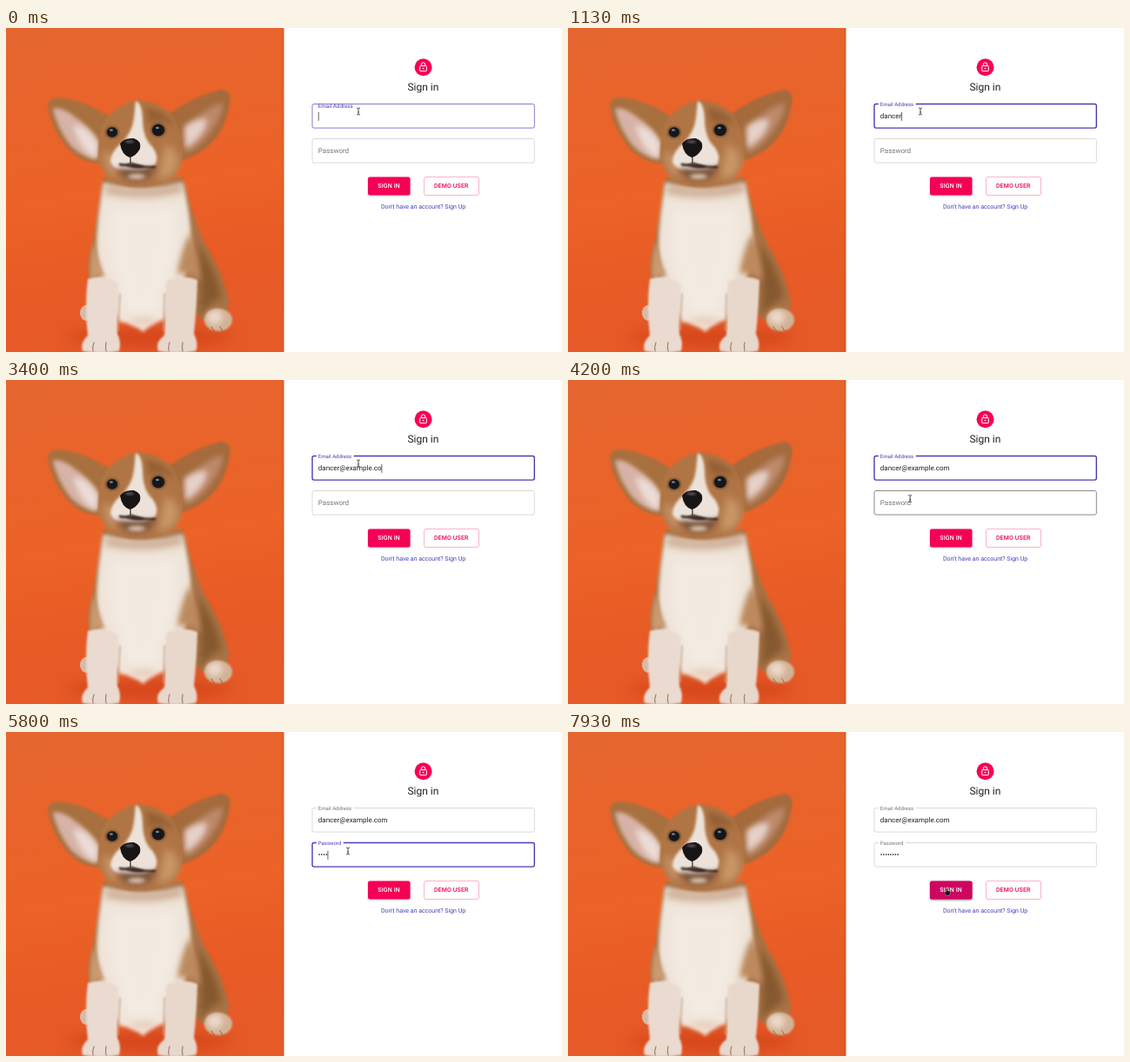
Recreate the animation shown at these times as an HTML page with a canvas. Size 639 by 373 pixels, loop 8 s.

```html
<!DOCTYPE html>
<html lang="en">
<head>
<meta charset="utf-8">
<title>Sign in</title>
<style>
  html, body { margin: 0; width: 100%; height: 100%; overflow: hidden; background: #fff; }
  canvas, svg { position: absolute; left: 0; top: 0; width: 639px; height: 373px; }
  text { font-family: Roboto, Arial, sans-serif; text-rendering: geometricPrecision; white-space: pre; }
  .body { font-size: 8px; }
  .btn { font-size: 7px; font-weight: 500; letter-spacing: .02em; text-anchor: middle; }
</style>
</head>
<body>
<canvas id="photo"></canvas>
<svg id="ui" viewBox="0 0 639 373">
  <defs>
    <linearGradient id="edge"><stop offset="0" stop-opacity="0"/><stop offset="1" stop-opacity=".1"/></linearGradient>
    <clipPath id="btnClip"><rect x="416" y="171.5" width="48.5" height="21" rx="2"/></clipPath>
    <filter id="soft" x="-20%" y="-40%" width="140%" height="180%"><feGaussianBlur stdDeviation="1.2"/></filter>
  </defs>
  <rect x="316" width="4" height="373" fill="url(#edge)"/>
  <rect x="319.5" width="320" height="373" fill="#fff"/>
  <circle cx="479.6" cy="45.3" r="10" fill="#f50057"/>
  <g fill="none" stroke="#fff" stroke-width="1">
    <rect x="475.7" y="43.6" width="7.6" height="6.1" rx=".7"/>
    <path d="M477.3 43.5V42a2.2 2.2 0 0 1 4.4 0v1.5"/>
    <circle cx="479.5" cy="46.6" r=".6" fill="#fff" stroke-width=".6"/>
  </g>
  <text x="479.4" y="71.6" font-size="12" text-anchor="middle" fill="#212121">Sign in</text>
  <g id="fields"></g>
  <rect id="shade" x="416" y="172.6" width="48.5" height="21" rx="2" filter="url(#soft)"/>
  <rect id="signIn" x="416" y="171.5" width="48.5" height="21" rx="2"/>
  <g clip-path="url(#btnClip)"><circle id="ripple" cx="436" cy="184" fill="#f50057"/></g>
  <text class="btn" x="440.1" y="184.4" fill="#fff">SIGN IN</text>
  <rect x="480.5" y="171.5" width="63" height="21" rx="2" fill="#fff" stroke="#f50057" stroke-opacity=".3"/>
  <text class="btn" x="511.7" y="184.4" fill="#f50057">DEMO USER</text>
  <text x="479.6" y="208" font-size="7" text-anchor="middle" fill="#453fb5">Don't have an account? Sign Up</text>
  <g id="mouse">
    <path id="beam" d="M-2 -4Q0 -4 0 -2.8Q0 -4 2 -4M0 -3V3M-2 4Q0 4 0 2.8Q0 4 2 4M-1 .9H1" fill="none" stroke="#444" stroke-width=".9"/>
    <path id="arrow" d="M-2 -4V3.5L-.3 1.9L.8 4.4L1.9 3.9L.8 1.5H3.2Z" fill="#111" stroke="#fff" stroke-width=".6"/>
    <path id="hand" d="M-1.8 -3.8Q-.8 -4.6 -.2 -3.6L.1 -1.4L2.6 -.9Q3.5 -.6 3.4 .6L2.6 4H-1.4L-3.6 .8Q-3.6 -.3 -2.4 0L-1.4 .6Z" fill="#111" stroke="#fff" stroke-width=".3"/>
  </g>
</svg>
<script>
const LOOP = 8000, PRIMARY = '#453fb5', GREY = '#757575';
const $ = id => document.getElementById(id);
const clamp = v => Math.min(1, Math.max(0, v));
const mix = (a, b, p) => a + (b - a) * p;
const smooth = p => p * p * (3 - 2 * p);
const easeOut = p => 1 - (1 - clamp(p)) ** 3;

function set(el, attrs) {
  for (const k in attrs) el.setAttribute(k, attrs[k]);
  return el;
}
function add(parent, tag, attrs, text = '') {
  const el = set(document.createElementNS('http://www.w3.org/2000/svg', tag), attrs);
  el.textContent = text;
  return parent.appendChild(el);
}

// ---- photo ----
function paintPhoto() {
  const cv = $('photo'), dpr = window.devicePixelRatio || 1;
  cv.width = 639 * dpr;
  cv.height = 373 * dpr;
  const c = cv.getContext('2d');
  c.scale(dpr, dpr);
  c.beginPath();
  c.rect(0, 0, 320, 373);
  c.clip();

  const shape = (color, d, blur = .8) => {
    c.filter = `blur(${blur * dpr}px)`;
    c.fillStyle = color;
    c.fill(new Path2D(d));
  };
  const oval = (color, x, y, rx, ry, blur = .6) => {
    c.filter = `blur(${blur * dpr}px)`;
    c.fillStyle = color;
    c.beginPath();
    c.ellipse(x, y, rx, ry, 0, 0, 7);
    c.fill();
  };
  const line = (color, width, d, blur = .5) => {
    c.filter = `blur(${blur * dpr}px)`;
    c.strokeStyle = color;
    c.lineWidth = width;
    c.lineCap = 'round';
    c.stroke(new Path2D(d));
  };

  const wall = c.createLinearGradient(0, 0, 60, 373);
  wall.addColorStop(0, '#e5662f');
  wall.addColorStop(.55, '#ec6227');
  wall.addColorStop(.8, '#e85b25');
  wall.addColorStop(1, '#e65a28');
  c.fillStyle = wall;
  c.fillRect(0, 0, 320, 373);
  oval('rgba(200,58,18,.55)', 165, 356, 95, 12, 8);

  // ears
  shape('#a9703f', 'M48 90Q49 80 62 80Q92 84 120 103L110 156Q88 156 72 140Q52 116 48 90Z', 1);
  shape('#d6b3a6', 'M54 93Q62 90 76 100Q98 114 108 134L105 151Q88 149 75 136Q59 116 54 93Z', 2);
  shape('#ecdcd6', 'M77 112Q94 112 106 134L104 149Q88 146 77 112Z', 3);
  shape('#a56b3d', 'M186 100Q214 79 247 71Q260 72 257 87Q251 125 224 142Q212 150 202 152Z', 1);
  shape('#bd8a6d', 'M208 112Q230 92 249 86Q249 98 241 110Q229 132 206 145Z', 3);
  shape('#e6d0c8', 'M205 114Q219 103 231 105Q229 125 206 138Z', 3);

  // body and hind feet
  oval('#d8b9a4', 92, 328, 7, 9);
  shape('#a97345', 'M112 172Q105 215 100 245Q92 270 96 296L130 320H205L232 340Q258 334 256 312Q246 275 230 250Q216 222 203 172Z', 1);
  shape('#85582f', 'M214 244Q238 266 248 310Q234 316 222 334Q228 285 214 244Z', 4);
  oval('#d3b398', 244, 336, 16, 13, 1);
  oval('#ead8c8', 240, 333, 9, 8, 3);
  line('#8f6650', 1, 'M236 344Q238 348 240 349M246 344Q248 348 249 349');

  // chest, belly and front legs
  shape('#efe4d9', 'M112 178Q157 192 203 178Q212 212 213 248Q213 274 202 292L182 336Q168 338 158 350Q146 340 130 338L113 294Q104 278 104 250Q105 215 112 178Z', 2);
  shape('#f3ebe2', 'M122 204Q157 218 194 204Q200 250 184 292L176 326Q157 336 137 326L128 292Q114 250 122 204Z', 7);
  oval('#ecd0c2', 157, 337, 15, 5, 3);
  shape('#c9a78c', 'M114 180Q156 192 202 178L204 188Q160 200 113 190Z', 4);
  shape('#c9996f', 'M101 246Q95 268 97 290Q106 284 114 286Q106 268 101 246Z', 2);
  shape('#bd8a5e', 'M211 236Q199 262 197 284Q210 278 223 292Q222 258 211 236Z', 3);
  shape('#eadacf', 'M94 289Q112 282 129 294L128 352Q133 362 130 372Q108 376 88 372Q85 362 94 354Q90 320 94 289Z', 1);
  shape('#e8d7cb', 'M184 292Q202 282 220 290Q219 325 216 352Q222 364 218 372Q196 376 175 372Q171 362 182 354Z', 1);
  line('#c9a58f', 1.4, 'M131 306L129 348M182 306L181 348', 1.2);
  line('#8f6e5c', 1, 'M101 362Q99 367 100 372M115 362Q114 367 115 372M188 362Q186 367 187 372M203 362Q202 367 203 372');

  // head
  shape('#b07544', 'M114 105Q130 87 151 83Q175 85 191 100Q204 122 203 146Q201 168 184 176Q156 188 130 179Q110 170 106 148Q105 122 114 105Z', 1.2);
  shape('#955f34', 'M160 91Q186 96 194 114Q181 104 164 110Z', 3);
  shape('#c99668', 'M183 134Q202 140 196 164Q188 174 174 174Z', 5);
  shape('#c39064', 'M111 142Q110 166 128 174L126 146Z', 4);
  shape('#ede2d9', 'M149 84Q156 86 157 104Q157 122 164 132Q178 146 171 158Q160 166 143 165Q124 165 120 154Q120 143 133 132Q145 120 147 104Z', 1.4);
  shape('#7d5640', 'M127 161Q150 164 173 160Q167 175 150 176Q134 175 127 161Z', 3);
  oval('#d9c4b5', 150, 171, 10, 3, 2);
  line('#2c1e1b', 2.4, 'M131 157Q138 159 144 156Q156 161 171 160', .8);
  shape('#3a2723', 'M136 158Q146 154 160 160Q149 164 136 158Z', .8);
  line('#36221b', 1.2, 'M143 146V155');
  shape('#191517', 'M131 133Q136 126 147 127Q156 130 154 139Q149 148 142 149Q133 146 131 133Z', .6);
  oval('#5d575b', 142, 131, 5, 1.4, 1);

  // eyes
  for (const [x, y, r] of [[122, 120, 6], [175, 117.5, 7]]) {
    oval('#5c3b27', x, y, r + 1.4, r + .6, 1.5);
    oval('#17161b', x, y, r, r - .3, .7);
    oval('#77879a', x - 1, y - 2.5, 2, 1.3, .6);
  }
}

// ---- form ----
const EMAIL = 'dancer@example.com';
const emailKeys = [400, 530, 680, 800, 930, 1070, 1270, 1400, 1830, 2130, 2500, 2670, 2800, 2930, 3070, 3200, 3330, 3530];
const passKeys = [5270, 5400, 5530, 5730, 5870, 6000, 6200, 6400];

function makeField(y, label, value, keys, focus, blur) {
  const g = $('fields'), base = y + 16.9;
  const box = add(g, 'rect', { x: 352, y, width: 255.3, height: 27.6, rx: 2, fill: 'none' });
  const notch = add(g, 'rect', { x: 356.8, y: y - 2, height: 4, fill: '#fff' });
  const title = add(g, 'text', { class: 'body' }, label);
  const text = add(g, 'text', { class: 'body', x: 358.8, y: base, fill: '#212121' });
  const caret = add(g, 'rect', { y: y + 9.3, width: .7, height: 10, fill: '#222' });
  const full = title.getComputedTextLength();

  return (t, hover) => {
    const on = t >= focus && t < blur;
    const rise = easeOut((t - focus) / 200);
    const open = easeOut((t - focus - 110) / 60);
    const typed = keys.filter(k => k <= t);
    const last = typed.length ? typed[typed.length - 1] : focus;
    set(box, {
      stroke: on ? PRIMARY : hover ? '#8a8a8a' : '#dadada',
      'stroke-opacity': on ? mix(.75, 1, open) : 1,
      'stroke-width': on ? mix(.9, 1.4, open) : 1
    });
    set(notch, { width: (full * .75 + 4.5) * open });
    set(title, {
      transform: `translate(358.8 ${mix(base, y + 2.5, rise)}) scale(${mix(1, .75, rise)})`,
      fill: on ? PRIMARY : GREY
    });
    text.textContent = value.slice(0, typed.length);
    const end = typed.length ? text.getComputedTextLength() : 0;
    set(caret, { x: 358.8 + end, opacity: +(on && (t - last) % 1000 < 500) });
  };
}

const PASS_FOCUS = 4330, PRESS = 7630;
const email = makeField(87.5, 'Email Address', EMAIL, emailKeys, -100, PASS_FOCUS);
const pass = makeField(127.5, 'Password', '•'.repeat(8), passKeys, PASS_FOCUS, PRESS);

// ---- pointer ----
const path = [[0, 405, 96], [3800, 405, 96], [4230, 393, 137], [6600, 393, 137], [6800, 398, 142], [7400, 436, 184], [LOOP, 436, 184]];

function pointer(t) {
  const i = path.findIndex(k => k[0] > t);
  const [t0, x0, y0] = path[i - 1], [t1, x1, y1] = path[i];
  const p = smooth((t - t0) / (t1 - t0));
  return [mix(x0, x1, p), mix(y0, y1, p)];
}

function moveMouse(t) {
  const [x, y] = pointer(t);
  const inPass = y > 127 && y < 156, inBtn = y > 171.5;
  const kind = inBtn ? 'hand' : inPass || y < 116 ? 'beam' : 'arrow';
  for (const id of ['beam', 'arrow', 'hand']) $(id).style.display = id === kind ? '' : 'none';
  set($('mouse'), { transform: `translate(${x} ${y})` });
  return inPass;
}

function drawButton(t) {
  const h = easeOut((t - 7280) / 250), r = clamp((t - PRESS) / 550);
  const pressed = +(r > 0);
  set($('signIn'), { fill: `rgb(${mix(245, 197, h)},${mix(0, 8, h)},${mix(87, 100, h)})` });
  set($('shade'), { 'fill-opacity': mix(.22, .38, h) + pressed * .12 });
  set($('ripple'), { r: 36 * easeOut(r), opacity: pressed * .2 });
}

function frame(now) {
  const t = Math.max(0, now) % LOOP;
  const inPass = moveMouse(t);
  email(t, false);
  pass(t, inPass);
  drawButton(t);
  requestAnimationFrame(frame);
}

paintPhoto();
requestAnimationFrame(frame);
</script>
</body>
</html>
```
